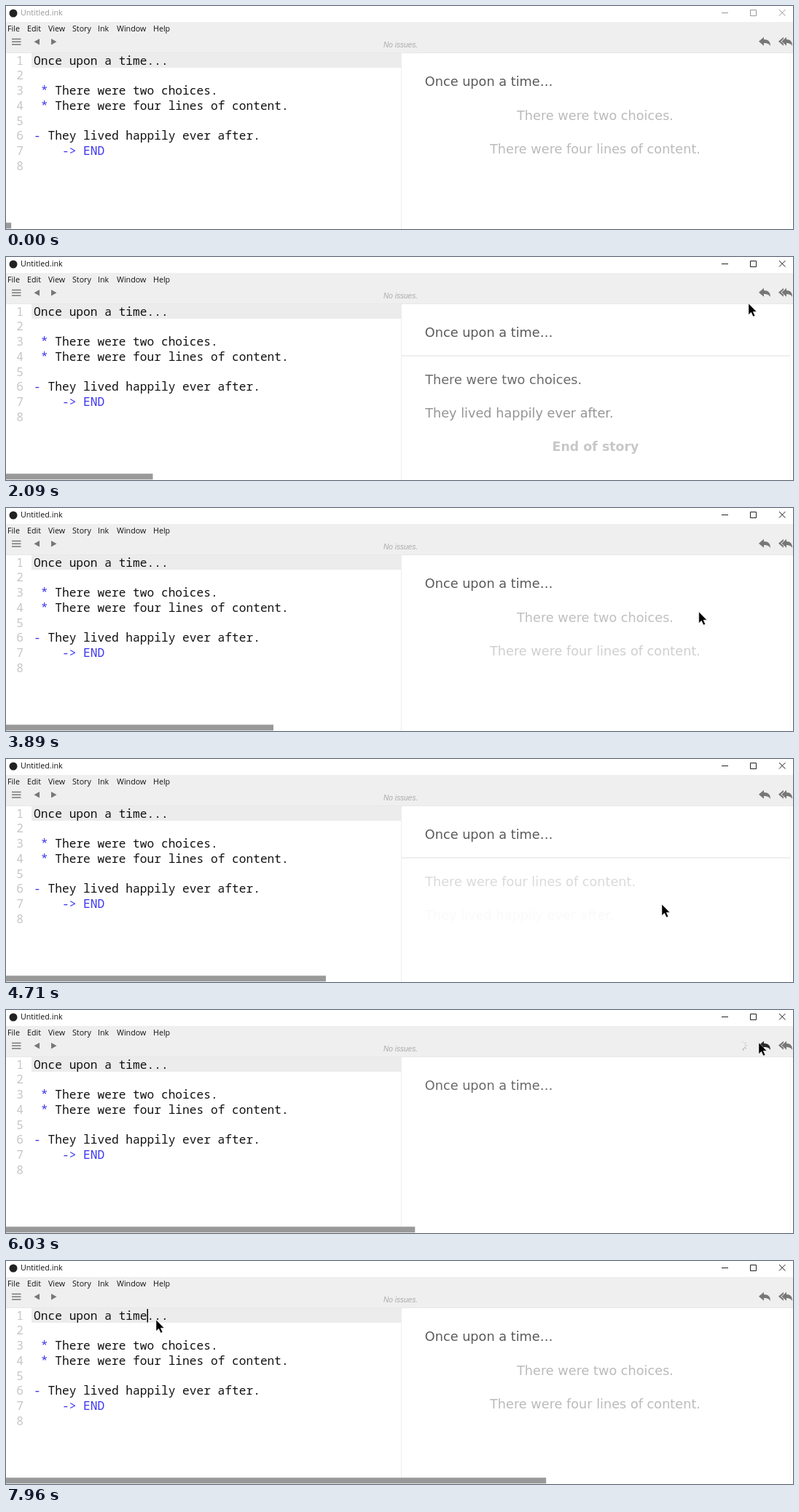
Animation, 1080 px wide and 307 px high, one loop 8 s. Source, as an HTML page:

```html
<!DOCTYPE html>
<html lang="en">
<head>
<meta charset="utf-8">
<title>Story editor</title>
<style>
  html, body { margin: 0; width: 100%; height: 100%; overflow: hidden; background: #fff; }
  svg { display: block; width: 100vw; height: 100vh; }
  text { white-space: pre; }
  .ui { font: 10.7px "Open Sans", sans-serif; fill: #111; }
  .status { font: italic 10.1px "Liberation Sans", sans-serif; fill: #aaa; text-anchor: middle; }
  .code { font: 16.2px "Noto Sans Mono", monospace; fill: #111; }
  .num { fill: #c6c6c6; text-anchor: end; }
  .key { fill: #3c35ee; }
  .story { font: 17.7px "DejaVu Sans", sans-serif; fill: #5a5a5a; }
  .mid { text-anchor: middle; }
  .choice { fill: #bbb; }
  .choice.hover { fill: #5a5a5a; text-decoration: underline; }
  .ending { font-size: 17.4px; font-weight: bold; }
  .icon { fill: #777; }
  .icon.hover { fill: #2b2b2b; }
  #controls { fill: none; stroke: #222; }
  .inactive #title { fill: #999; }
  .inactive #controls { stroke: #999; }
</style>
</head>
<body>
<svg id="stage" viewBox="0 0 1080 307" preserveAspectRatio="none">
  <rect width="1080" height="307" fill="#fff"/>
  <circle cx="10" cy="10" r="5.5" fill="#222"/>
  <text id="title" class="ui" x="20" y="13">Untitled.ink</text>
  <path id="controls" d="M982 9.5h9M1021.5 5.5h8v8h-8zM1061 5l8.5 8.5M1069.5 5l-8.5 8.5"/>

  <rect y="22" width="1080" height="42" fill="#efefef"/>
  <rect y="64" width="1080" height="1" fill="#e8e8e8"/>
  <g id="menu" class="ui"></g>
  <path d="M8 45.5h12.5M8 49.3h12.5M8 53h12.5" stroke="#777" stroke-width="1.6"/>
  <path class="icon" d="M46 45v8.4l-7.5-4.2zM62 45v8.4l7.5-4.2z"/>
  <text class="status" x="541.5" y="57">No issues.</text>
  <g id="spinner" stroke="#888" stroke-width="1.3"></g>
  <path id="undo" class="icon" d="M1033 48.7l7-6v3.4c6 .1 9 3 9 9c-2-3-4-4-9-4v3.6z"/>
  <path class="icon" d="M1067 42.7v2.6l-3.7 3.4l3.7 3.4v2.6l-7-6zM1064.5 48.7l6.5-6v3.4c5.5 .1 8 3 8 9c-2-3-4-4-8-4v3.6z"/>

  <rect x="35" y="65" width="507" height="20" fill="#ececec"/>
  <g id="editor" class="code"></g>
  <rect id="caret" x="193.5" y="66" width="1.5" height="18.5" fill="#000"/>

  <path d="M542.5 65V307" stroke="#eee"/>
  <path d="M1076.5 65V307" stroke="#f7f7f7"/>
  <text id="intro" class="story" x="574.8" y="110">Once upon a time…</text>
  <g id="choices" class="story mid">
    <text class="choice" x="808.5" y="156.5">There were two choices.</text>
    <text class="choice" x="808.5" y="202.5">There were four lines of content.</text>
  </g>
  <g id="result" class="story">
    <path d="M543 136H1076" stroke="#e8e8e8" stroke-width="1.5"/>
    <text x="575.2" y="174.5"></text>
    <text x="575.2" y="220.5">They lived happily ever after.</text>
    <text class="mid ending" x="809" y="266.5">End of story</text>
  </g>

  <rect id="progress" y="298.3" height="8" fill="#999"/>
  <g id="pointer" stroke="#fff" stroke-width=".5">
    <path id="arrow" d="M0 0V15.5L3.6 12.2L6.3 18L8.9 17L6.3 11.3H11z"/>
    <path id="hand" d="M-1.7 .5Q0-1 1.6 .5V6.5Q3.5 5.5 4.8 6.800Q6.5 6 7.5 7.5Q9.5 7.3 9.5 9.5V14L7.5 17V20H-.5V17.5L-5 12Q-6 9.5-4 9.3L-1.7 11z"/>
  </g>
</svg>
<script>
const $ = id => document.getElementById(id);
const LOOP = 8000;
const BARS = [0, 850, 1700, 2550, 3410, 4290, 5170, 6030, 6860, 7710, 8627];
const STEPS = 11;
const CLICK = { first: 1300, undo1: 2780, second: 4380, undo2: 5790, caret: 7450 };

// Pointer stops: time, x, y
const PATH = [
  [0, 1030, 330], [100, 1018, 310], [720, 877, 151], [1640, 877, 151],
  [2090, 1019, 64], [2420, 1039, 44], [3450, 1039, 44], [4200, 900, 200],
  [5250, 900, 200], [5700, 1033, 45], [6130, 1033, 45], [6860, 323, 92],
  [7300, 186, 74], [7810, 191, 75], [7960, 206, 81]
];

const MENU = [[2, "File"], [29, "Edit"], [58, "View"], [91, "Story"], [126, "Ink"], [152, "Window"], [202, "Help"]];
$("menu").innerHTML = MENU.map(([x, s]) => `<text x="${x}" y="35">${s}</text>`).join("");

const key = s => `<tspan class="key">${s}</tspan>`;
const LINES = [
  "Once upon a time...", "",
  ` ${key("*")} There were two choices.`,
  ` ${key("*")} There were four lines of content.`, "",
  `${key("-")} They lived happily ever after.`,
  `    ${key("-&gt; END")}`, ""
];
$("editor").innerHTML = LINES.map((line, i) => {
  const y = 80.5 + 20.75 * i;
  return `<text class="num" x="24" y="${y}">${i + 1}</text><text x="38.1" y="${y}">${line}</text>`;
}).join("");

const SPOKES = 10;
$("spinner").innerHTML = Array.from({ length: SPOKES }, (_, i) =>
  `<path d="M1014 49h3" transform="rotate(${i * 360 / SPOKES} 1010 49)"/>`).join("");

const choices = [...$("choices").children];
const results = [...$("result").querySelectorAll("text")];
const clamp = v => Math.min(1, Math.max(0, v));
const swing = v => 0.5 - Math.cos(Math.PI * clamp(v)) / 2;
const fade = (t, start, length = 1000) => swing((t - start) / length);
const show = (el, on) => { el.style.display = on ? "" : "none"; };
const within = (x, y, l, t, r, b) => x >= l && x <= r && y >= t && y <= b;

function snap(t) {
  const k = BARS.findLastIndex(b => b <= t);
  const size = (BARS[k + 1] - BARS[k]) / STEPS;
  const n = Math.floor((t - BARS[k]) / size + 0.01);
  return { t: BARS[k] + n * size, index: k * STEPS + n };
}

function pointerAt(t) {
  const i = PATH.findIndex(p => p[0] > t);
  if (i < 0) return PATH.at(-1).slice(1);
  const [a, b] = [PATH[i - 1], PATH[i]];
  const f = swing((t - a[0]) / (b[0] - a[0]));
  return [a[1] + (b[1] - a[1]) * f, a[2] + (b[2] - a[2]) * f];
}

function drawSpinner(t, reset) {
  const on = reset && t < reset + 550;
  show($("spinner"), on);
  if (!on) return;
  const head = (t - 3020) / 860 - 0.25;
  [...$("spinner").children].forEach((spoke, i) => {
    const lag = (((head - i / SPOKES) % 1) + 1.001) % 1;
    spoke.style.opacity = 0.7 * clamp(1 - lag * 1.7);
  });
}

function render(now) {
  const { t, index } = snap(now % LOOP);
  const [x, y] = pointerAt(t);
  const picked = t >= CLICK.second && t < CLICK.undo2 ? CLICK.second
    : t >= CLICK.first && t < CLICK.undo1 ? CLICK.first : 0;
  const reset = picked ? 0 : t >= CLICK.undo2 ? CLICK.undo2 : t >= CLICK.undo1 ? CLICK.undo1 : 0;

  $("stage").classList.toggle("inactive", t < CLICK.first);
  $("progress").setAttribute("width", 7.196 * (index + 1));
  $("intro").style.opacity = reset ? fade(t, reset, 300) : 1;
  show($("choices"), !picked);
  show($("result"), picked);
  show($("caret"), t >= CLICK.caret);

  let hand = false;
  choices.forEach((choice, i) => {
    const hover = !picked && within(x, y, i ? 664 : 701, 142 + 46 * i, i ? 953 : 916, 161 + 46 * i);
    choice.classList.toggle("hover", hover);
    choice.style.opacity = reset ? fade(t, reset + 280 + 200 * i) : 1;
    hand ||= hover;
  });
  if (picked) {
    results[0].textContent = choices[picked === CLICK.first ? 0 : 1].textContent;
    results.forEach((line, i) => { line.style.opacity = fade(t, picked + 200 * i); });
  }

  $("undo").classList.toggle("hover", within(x, y, 1030, 40, 1052, 58));
  drawSpinner(t, reset);
  $("pointer").setAttribute("transform", `translate(${x} ${y})`);
  show($("arrow"), !hand);
  show($("hand"), hand);
}

const began = performance.now();
function tick() {
  render(performance.now() - began);
  requestAnimationFrame(tick);
}
tick();
</script>
</body>
</html>
```
